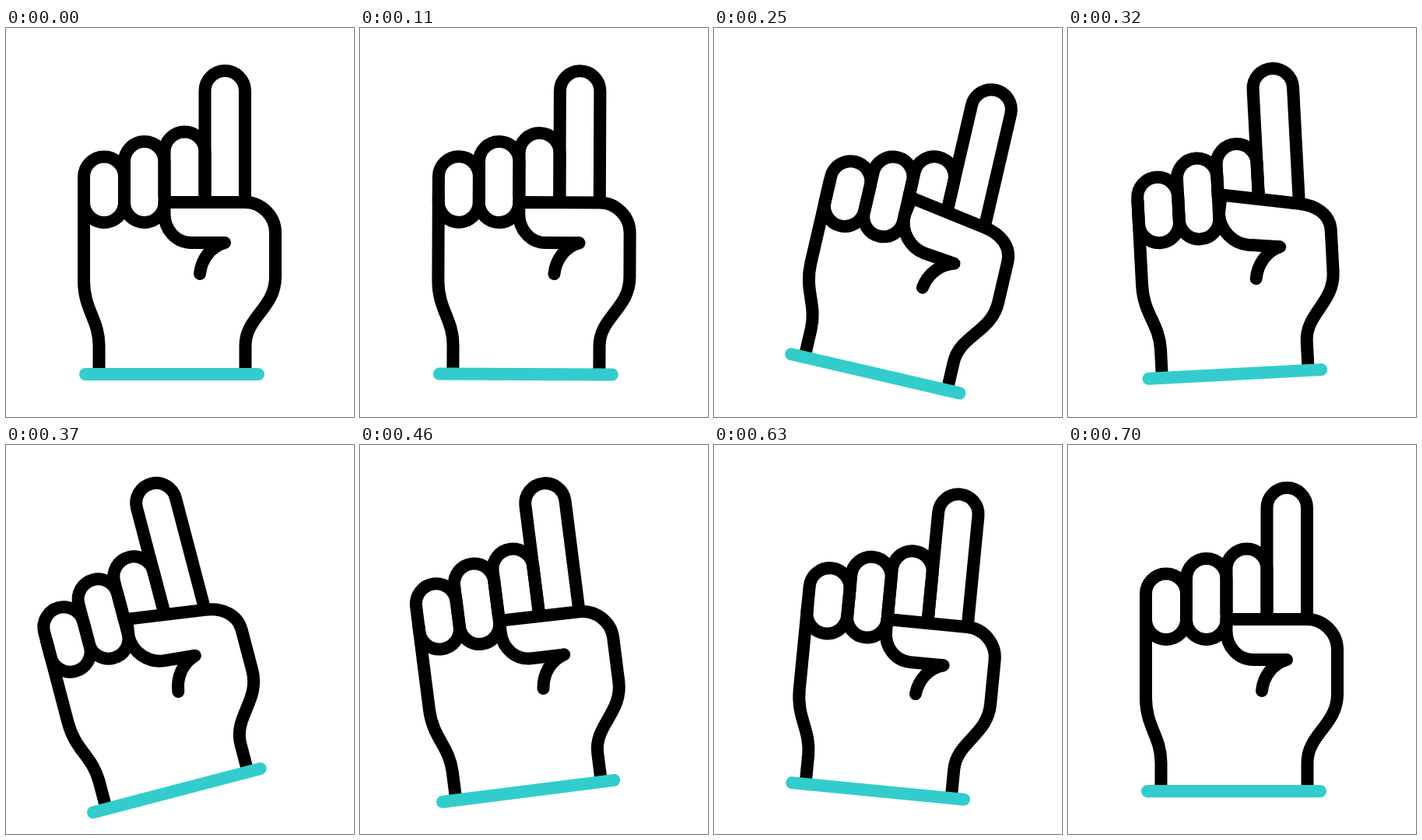
An HTML page for the animation above (1.3 s loop, 447 by 500 pixels).

```html
<!DOCTYPE html>
<html lang="en">
<head>
<meta charset="utf-8">
<title>Pointing hand</title>
<style>
  html, body { margin: 0; width: 100%; height: 100%; overflow: hidden; background: #fff; }
  svg { display: block; width: 100%; height: 100%; }
  path { fill: none; stroke: #000; stroke-width: 16; stroke-linejoin: round; }
  .round { stroke-linecap: round; }
  .bar { stroke: #33cccc; stroke-linecap: round; }
</style>
</head>
<body>
<svg viewBox="0 0 447 500">
  <g id="hand">
    <path d="M255.5 224V80.8a25.75 25.75 0 0 1 51.5 0V226"/>
    <path id="middle"/>
    <path id="ring"/>
    <path id="pinky"/>
    <path d="M100 215V325C100 362 119.5 375 119.5 408V440"/>
    <path id="thumb"/>
    <path id="crease" class="round"/>
    <path class="bar" d="M102 445H324"/>
  </g>
</svg>
<script>
const LOOP = 1300, REST_END = 110;

// wrist swing: [ms, degrees]
const swing = [[100, 0], [240, 13.5], [390, -16], [564, 8.1], [590, 8.1], [700, 0]];

const get = id => document.getElementById(id);
const draw = (id, d) => get(id).setAttribute("d", d);
const clamp = u => Math.min(1, Math.max(0, u));
const ease = u => u * u * (3 - 2 * u);

// rises to 1 around the peak and falls back the same way
const bump = (t, peak, half, ramp) => ease(clamp((half - Math.abs(t - peak)) / ramp));

// sum of eased steps between neighbouring keys
const tilt = t => swing.slice(1).reduce((sum, [t1, a1], i) => {
  const [t0, a0] = swing[i];
  return sum + (a1 - a0) * ease(clamp((t - t0) / (t1 - t0)));
}, 0);

// fingers curl one after another, the middle one first
const curl = (t, order) => 22 * bump(t, 255 + 19 * order, 168, 155);

function capsule(left, right, top, bottom) {
  const r = (right - left) / 2;
  const arc = x => `A${r} ${r} 0 0 1 ${x} `;
  return `M${left} ${bottom - r}V${top + r}${arc(right)}${top + r}V${bottom - r}${arc(left)}${bottom - r}Z`;
}

// k is the bend of the thumb, from 0 to 1
function drawThumb(k) {
  const knuckle = 224 + 6.5 * k, low = 276 + 4 * k;
  const tipX = 281 - 1.5 * k, tipY = 276 + 8.6 * k;
  draw("thumb",
    `M${tipX} ${tipY}L${238 + k} ${low}C${219 + k} ${low - 3 * k} 203.5 260 203.5 ${239 - k}` +
    `L${203.5 + 4 * k} ${224 - 10 * k}L307 ${knuckle}` +
    `C328.5 ${knuckle + 3.4 * k} 346 ${242 + 4 * k} 346 ${263 + 4 * k}` +
    `V320C346 360 307.5 372 307.5 408V440`);
  draw("crease",
    `M${tipX} ${tipY}c-18 5 -30 21 ${-32 - 0.7 * k} ${40 - 0.8 * k}`);
}

function render(t) {
  const m = curl(t, 0), r = curl(t, 1), p = curl(t, 2);
  draw("middle", `M203.5 218V${159.5 + m}a26 26 0 0 1 52 0V222`);
  draw("ring", capsule(152, 203.5, 146 + r, 250 + r));
  draw("pinky", capsule(100, 152, 165.5 + p, 250 + p));
  drawThumb(bump(t, 300, 190, 160));
  get("hand").setAttribute("transform", `rotate(${tilt(t)} 213 420)`);
}

const start = performance.now();
function tick(now) {
  const t = Math.max(0, now - start) % LOOP;
  render(t < REST_END ? 0 : t);
  requestAnimationFrame(tick);
}
render(0);
requestAnimationFrame(tick);
</script>
</body>
</html>
```
